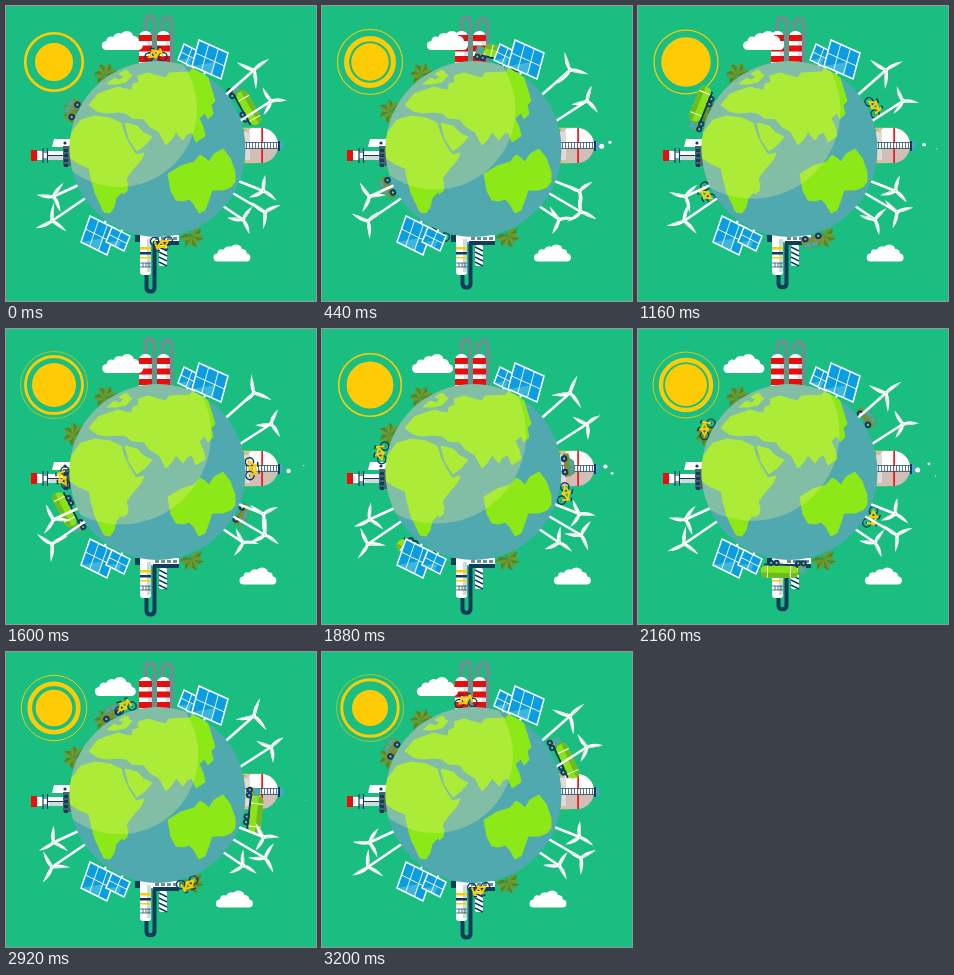
An HTML page with a canvas for the animation above (3.24 s loop, 310 px wide and 295 px high).

```html
<!DOCTYPE html>
<html lang="en">
<head>
<meta charset="utf-8">
<title>Green planet</title>
<style>
html, body { margin: 0; width: 100%; height: 100%; overflow: hidden; background: #19be80; }
canvas { display: block; }
</style>
</head>
<body>
<canvas id="stage" width="310" height="295"></canvas>
<script>
const c = document.getElementById('stage').getContext('2d');
const LOOP = 3240, TAU = Math.PI * 2, CX = 151.5, CY = 143, R = 88;
const WHITE = '#fff', NAVY = '#123c5a', YELLOW = '#ffcb05', RED = '#f00b0b',
      GRAY = '#6c8f90', BLUE = '#0b9de0', LAND = '#8ce817', OCEAN = '#51a9b0',
      SHADE = '#cfdadb', GLASS = '#3fa9c9';

function rect(color, x, y, w, h) {
  c.fillStyle = color;
  c.fillRect(x, y, w, h);
}
function disc(color, x, y, r) {
  c.fillStyle = color;
  c.beginPath();
  c.arc(x, y, r, 0, TAU);
  c.fill();
}
function ring(color, x, y, r, w) {
  c.strokeStyle = color;
  c.lineWidth = w;
  c.beginPath();
  c.arc(x, y, r, 0, TAU);
  c.stroke();
}
function fill(color, d) {
  c.fillStyle = color;
  c.fill(new Path2D(d));
}
function line(color, w, d) {
  c.strokeStyle = color;
  c.lineWidth = w;
  c.stroke(new Path2D(d));
}
function pill(color, x, y, w, h, r) {
  c.fillStyle = color;
  c.beginPath();
  c.roundRect(x, y, w, h, r);
  c.fill();
}
function at(x, y, deg, draw) {
  c.save();
  c.translate(x, y);
  c.rotate(deg * TAU / 360);
  draw();
  c.restore();
}
// Stands a drawing on the globe; degrees run clockwise from the top.
function onGlobe(deg, draw) {
  at(CX, CY, deg, () => {
    c.translate(0, -R);
    draw();
  });
}

function sun(t, phase) {
  const x = 48, y = 56, period = LOOP / 4;
  disc(YELLOW, x, y, 20 - 2 * Math.cos(phase));
  for (const shift of [0, period]) {
    const u = (t + shift) % (2 * period) / (2 * period);
    const k = (1 - u) ** 2, w = 0.6 + 8.5 * k;
    ring(YELLOW, x, y, 19 + 14.8 * (1 - k) - w / 2, w);
  }
}

function cloud(x, y, s) {
  c.save();
  c.translate(x, y);
  c.scale(s, s);
  pill(WHITE, -20, -9, 41, 9, 4.5);
  disc(WHITE, -11, -9, 4.5);
  disc(WHITE, -3, -11, 6);
  disc(WHITE, 5, -12, 7);
  disc(WHITE, 12, -9, 5);
  c.restore();
}

function chimneys(bob) {
  const y = 12 - 1.5 * bob;
  line(GRAY, 4, `M139.5 30V${y + 4}q0-4.5 4.5-4.5t4.5 4.5V60`);
  line(GRAY, 4, `M156.5 30V${y + 5}q0-4.5 4.5-4.5t4.5 4.5V60`);
  for (const x of [133, 151]) {
    pill(WHITE, x, 25, 13, 35, [6, 6, 0, 0]);
    for (const y0 of [29, 39.5, 50]) rect(RED, x, y0, 13, 6);
    rect('rgba(60,80,90,.18)', x + 9, 28, 4, 32);
  }
}

function bottomPlant(bob) {
  const y = 278 + 3.5 * bob;
  line(NAVY, 4, `M140.5 264V${y}q0 4 4 4t4-4V238`);
  rect(NAVY, 129, 229, 5, 7);
  rect(WHITE, 134, 229, 39, 7);
  for (let x = 149; x < 172; x += 6) rect(GRAY, x, 231, 4, 3);
  rect(NAVY, 147, 235, 26, 4);
  pill(WHITE, 134, 231, 11, 38, 3);
  rect(SHADE, 141, 233, 4, 33);
  rect(YELLOW, 134, 241, 11, 2.5);
  rect(NAVY, 134, 246, 11, 2.5);
  rect(YELLOW, 134, 251, 11, 1.5);
  line(NAVY, 0.7, 'M134 257H145M134 261H145M137 257V261M140 257V261M143 257V261');
  pill(WHITE, 153, 239, 8, 21, 2);
  for (let y0 = 241; y0 < 257; y0 += 5) line(NAVY, 1.5, `M153 ${y0}l8 4`);
}

function leftPlant() {
  fill(WHITE, 'M48 133H64V141H46Z');
  disc(NAVY, 59, 137, 1.6);
  rect('#46636e', 57, 140, 9, 20);
  for (let y = 143; y < 159; y += 5) rect(NAVY, 58, y, 4, 3);
  rect(WHITE, 31, 145, 26, 9);
  rect(SHADE, 43, 150, 14, 4);
  rect(RED, 25, 144, 6, 11);
  line(NAVY, 1.2, 'M37 142V157M41.5 142V157M37 146H42M37 153H42M42 149.5H57');
}

function tank(t) {
  line(YELLOW, 1.6, 'M234 122.5H256M234 156.5H250');
  pill('#d0beb7', 238, 122, 34, 35, [4, 17, 17, 4]);
  pill(WHITE, 243, 122, 29, 18, [4, 17, 0, 0]);
  rect('#e4dad5', 238, 126, 6, 28);
  rect(RED, 255.3, 122, 1.6, 35);
  rect('rgba(255,255,255,.8)', 238, 136.5, 35, 6);
  line(NAVY, 0.7, 'M238 136.5H273M238 142.5H273');
  for (let x = 240; x < 273; x += 3) rect(NAVY, x, 136.5, 0.7, 6);
  rect(NAVY, 272, 135, 2, 10);
  rect(GLASS, 274, 135.5, 3, 9);
  // Puffs from the valve: start time and vertical drift.
  for (const [start, drift] of [[30, -8], [340, 3], [820, -4], [1390, 8], [1640, -9], [2060, 9]]) {
    const u = (t - start) / 900;
    if (u > 0 && u < 1) disc(WHITE, 277 + 24 * u, 140 + drift * u, 2.5 * (1 - u) + 0.3);
  }
}

function plant(x, y, deg) {
  at(x, y, deg, () => {
    for (const a of [-105, -55, 0, 55, 105]) {
      at(0, 3, a, () => {
        fill('#6b9c2f', 'M0 0Q-7-6 0-12Q7-6 0 0');
        fill('#50852f', 'M0 0Q7-6 0-12Z');
      });
    }
    line('#50852f', 1, 'M0 9V3');
  });
}

function wheel(x, r) {
  disc(NAVY, x, -r, r);
  disc('#9fb4b8', x, -r, r * 0.35);
}

function truck() {
  rect(NAVY, -18, -6, 42, 2);
  pill('#8ae317', -10, -18, 37, 12, 5);
  pill('#6fba1e', -10, -18, 37, 5, [5, 5, 0, 0]);
  rect(WHITE, -3, -18, 1, 12);
  rect(WHITE, 20, -18, 1, 12);
  pill('#79a832', -18, -14, 8, 10, 2);
  rect(GLASS, -17.5, -13, 6, 5.5);
  for (const x of [-15.5, -10, 11.5, 17]) wheel(x, 3.1);
}

function car() {
  fill('#75953a', 'M-12-3V-8L-7-9L-4-13H8L11-8V-3Z');
  fill(GLASS, 'M-6-8.5L-3-12H1V-8.5ZM2.5-12H7L9-8.5H2.5Z');
  rect('#8f7a45', -12, -5, 23, 2);
  wheel(-7, 3.3);
  wheel(6.5, 3.3);
}

function bike() {
  for (const x of [-6.8, 6.8]) {
    ring(NAVY, x, -4.2, 4.2, 1.4);
    disc(NAVY, x, -4.2, 0.9);
  }
  line(YELLOW, 1.9, 'M-6.8-4.2L-3-10H4.5L0-4.5ZM-4-12L0-4.5M6.8-4.2L4-13');
  line(NAVY, 1.5, 'M-6.5-12.5H-1.5M2-13.5H5.5');
  disc(YELLOW, 0, -4.5, 1.8);
}

// The mast leans from the hub towards (CX, foot) and ends at the globe.
function turbine(x, y, len, deg, foot = CY) {
  line(WHITE, 2.6, `M${x} ${y}L${CX} ${foot}`);
  for (let k = 0; k < 3; k++) {
    at(x, y, deg + 120 * k, () => {
      fill(WHITE, `M-1 0Q-4.4-6 0-${len}Q1.8-6 1 0Z`);
      fill('#d5e0e0', `M0 0L0-${len}Q1.8-6 1 0Z`);
    });
  }
  disc(WHITE, x, y, 2.3);
  disc('#c9dedb', x, y, 0.9);
}

// Panel given by a corner and its two edge vectors.
function panel(x, y, ax, ay, bx, by, cols) {
  const box = `M${x} ${y}l${ax} ${ay}l${bx} ${by}l${-ax} ${-ay}Z`;
  fill(BLUE, box);
  fill('#3bb6dc', `M${x + bx} ${y + by}l${ax * 0.7} ${ay * 0.7}l${-bx * 0.5} ${-by * 0.5}Z`);
  line(WHITE, 1.5, box);
  for (let i = 1; i < cols; i++) {
    line(WHITE, 0.9, `M${x + ax * i / cols} ${y + ay * i / cols}l${bx} ${by}`);
  }
  line(WHITE, 0.9, `M${x + bx / 2} ${y + by / 2}l${ax} ${ay}`);
}

function panels() {
  line(WHITE, 2, 'M182 58L178 70M201 62L194 77M86 232L100 215M112 235L117 222');
  panel(178, 38, 16, 8, -6, 16, 2);
  panel(193, 34, 29, 13, -7, 26, 3);
  panel(84, 210, 26, 13, -9, 26, 3);
  panel(106, 221, 18, 9, -6, 15, 2);
}

const lands = [
  // Northern landmass
  'M83 99L92 88L103 84L112 81L119 83L126 84L127 78L133 76L132 70L142 67L152 70L160 72L163 67' +
  'L184 66L188 60L202 72L209 95L205 99L207 108L202 113L199 107L193 112L197 121L199 130L190 136' +
  'L186 126L181 128L177 134L170 126L165 134L160 139L153 126L143 120L138 113L126 112L120 107' +
  'L111 106L100 107L91 105Z',
  // Western landmass
  'M62 140L66 126L75 114L89 110L104 112L115 117L118 127L122 136L130 149L138 147Q136 155 128 162' +
  'L121 171L119 183L110 192L108 201L104 207L98 206L89 187L85 172L83 162L73 158L64 152Z',
  'M119 117L131 120L138 127L146 131L139 139L131 145L123 133Z',
  // Southern landmass
  'M162 168L175 160L188 156L194 149L199 152L203 156L208 148L217 143L224 152L229 166L229 176' +
  'L225 181L217 184L206 184L203 193L199 204L193 207L188 198L183 193L177 195L170 194L165 185Z',
  // Islands
  'M101 78L108 72L114 74L121 67L126 69L120 76L110 78Z',
  'M113 68L120 64L123 66L117 70Z',
  'M117 179L122 176L121 185L117 188Z'
];

function globe(phase) {
  c.save();
  c.beginPath();
  c.arc(CX, CY, R, 0, TAU);
  c.clip();
  rect(OCEAN, 60, 50, 184, 186);
  c.lineJoin = 'round';
  for (const d of lands) {
    fill(LAND, d);
    line(LAND, 1, d);
  }
  c.lineJoin = 'miter';
  const grow = 1 - Math.cos(phase);
  disc('rgba(255,244,140,.28)', 113 + 0.8 * grow, 103 + grow, 78 + 6.2 * grow);
  c.restore();
}

function draw(now) {
  const t = now % LOOP, phase = TAU * t / LOOP, deg = 360 * t / LOOP;
  const bob = Math.cos(2 * phase);
  rect('#19be80', 0, 0, 310, 295);
  sun(t, phase);
  chimneys(bob);
  cloud(115.8 + 12 * Math.sin(phase), 44, 1);
  cloud(238.5 - 13 * Math.cos(phase), 255.5, 0.9);

  bottomPlant(bob);
  leftPlant();
  tank(t);
  plant(98, 66, -34);
  plant(66, 104, -62);
  plant(187, 233, 155);

  onGlobe(61 - deg, truck);
  onGlobe(-65 - deg, car);
  onGlobe(-1 + deg / 2, bike);
  onGlobe(177.5 + deg / 2, bike);

  turbine(248, 64, 19, -66 + deg, 149);
  turbine(265, 95, 16, -32 + deg, 168);
  turbine(257.5, 185, 16, 6 + deg);
  turbine(259, 206, 17, -54 + deg);
  turbine(237, 213.5, 16, -84 + deg, 156);
  turbine(47.5, 190.5, 17, -84 + deg);
  turbine(46, 215, 18, 6 + deg);
  panels();
  globe(phase);
}

const start = performance.now();
function frame() {
  draw(performance.now() - start);
  requestAnimationFrame(frame);
}
frame();
</script>
</body>
</html>
```
